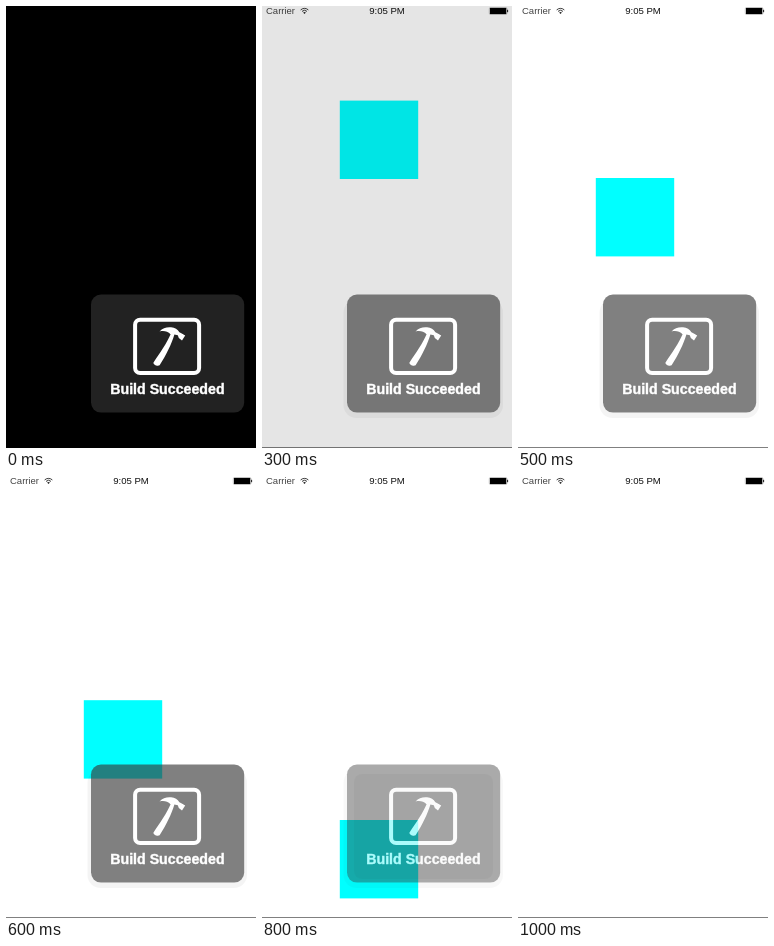
Recreate the animation shown at these times as an HTML page with a canvas. Size 250 by 442 pixels, loop 2400 ms.

```html
<!DOCTYPE html>
<html lang="en">
<head>
<meta charset="utf-8">
<title>Falling square</title>
<style>
html, body { margin: 0; width: 100%; height: 100%; overflow: hidden; background: #000; }
canvas { display: block; width: 250px; height: 442px; }
</style>
</head>
<body>
<canvas id="stage" width="250" height="442"></canvas>
<script>
const W = 250, H = 442, LOOP = 2400, STEP = 100;
const FONT = '"Liberation Sans", Arial, sans-serif';
const ctx = document.getElementById('stage').getContext('2d');

// One value per 100 ms step; the last value holds.
const dim = [1, 1, 0.5, 0.1, 0];
const squareTop = [80, 80, 79.7, 94.6, 128.8, 172, 224.2, 276, 344, 414, H];
const hudAlpha = [1, 1, 1, 1, 1, 1, 1, 1, 0.67, 0.32, 0];
const at = (list, i) => list[Math.min(i, list.length - 1)];

function roundRect(c, x, y, w, h, r) {
  c.beginPath();
  c.roundRect(x, y, w, h, r);
}

function drawHammer(c) {
  c.fill(new Path2D(
    'M153.6 325.4 C156.5 321.8 160.5 320.9 165 321.2 C169 321.6 171.6 323.2 173.4 326.3 ' +
    'L175.8 327.6 L179.2 329.4 L176 334.4 L172.8 332 L171.8 329.2 L168.4 328.4 ' +
    'C165.5 338 160 349.5 153.6 359.2 C151.6 360.6 147 358.6 147.5 356.4 ' +
    'C153.5 347.5 161 337 164.6 328.2 C161.5 325 157.5 324.4 153.6 325.4 Z'));
}

// The panel is composed once so that it fades as a group.
function makeHud() {
  const layer = document.createElement('canvas');
  layer.width = W;
  layer.height = H;
  const c = layer.getContext('2d');

  c.save();
  c.beginPath();
  c.rect(0, 0, W, H);
  c.roundRect(85, 288.6, 153.2, 118, 10);
  c.clip('evenodd');
  c.fillStyle = 'rgba(0,0,0,.045)';
  roundRect(c, 81.5, 293.5, 159.5, 118.5, 13);
  c.fill();
  c.restore();

  c.fillStyle = 'rgba(54,54,54,.63)';
  roundRect(c, 85, 288.6, 153.2, 118, 10);
  c.fill();

  c.strokeStyle = c.fillStyle = '#fff';
  c.lineWidth = 4;
  roundRect(c, 129.1, 313.8, 64, 53.2, 5);
  c.stroke();
  drawHammer(c);
  c.font = `bold 14.2px ${FONT}`;
  c.textAlign = 'center';
  c.lineWidth = 0.4;
  c.fillText('Build Succeeded', 161.4, 388.2);
  c.strokeText('Build Succeeded', 161.4, 388.2);
  return layer;
}

function drawStatusBar() {
  ctx.textAlign = 'left';
  ctx.font = `9.5px ${FONT}`;
  ctx.fillStyle = '#444';
  ctx.fillText('Carrier', 4, 8.2);

  ctx.fillStyle = '#111';
  ctx.textAlign = 'center';
  ctx.font = `9.6px ${FONT}`;
  ctx.fillText('9:05 PM', 125, 8.2);

  const up = -Math.PI / 2, spread = 0.76;
  ctx.fillStyle = ctx.strokeStyle = '#222';
  ctx.lineWidth = 0.9;
  for (const r of [3.6, 5.6]) {
    ctx.beginPath();
    ctx.arc(42.5, 8, r, up - spread, up + spread);
    ctx.stroke();
  }
  ctx.beginPath();
  ctx.moveTo(42.5, 8);
  ctx.arc(42.5, 8, 2, up - spread, up + spread);
  ctx.fill();

  ctx.fillStyle = '#000';
  ctx.strokeStyle = 'rgba(0,0,0,.45)';
  ctx.lineWidth = 0.6;
  roundRect(ctx, 227.3, 1.6, 17.6, 6.8, 1.2);
  ctx.stroke();
  ctx.fillRect(228, 2, 16.2, 6);
  ctx.fillRect(245.2, 3.8, 0.9, 2.4);
}

const hud = makeHud();

function draw(time) {
  const step = Math.floor((time % LOOP) / STEP);
  const alpha = at(hudAlpha, step);

  ctx.fillStyle = '#fff';
  ctx.fillRect(0, 0, W, H);
  drawStatusBar();
  ctx.fillStyle = '#0ff';
  ctx.fillRect(77.8, at(squareTop, step), 78.4, 78.4);
  ctx.fillStyle = '#808080';
  ctx.fillRect(0, 441, W, 1);

  ctx.fillStyle = `rgba(0,0,0,${at(dim, step)})`;
  ctx.fillRect(0, 0, W, H);

  if (alpha > 0 && alpha < 1) {
    ctx.fillStyle = 'rgba(0,0,0,.04)';
    roundRect(ctx, 92, 298, 139, 105, 8);
    ctx.fill();
  }
  ctx.globalAlpha = alpha;
  ctx.drawImage(hud, 0, 0);
  ctx.globalAlpha = 1;
}

const start = performance.now();
function tick() {
  draw(performance.now() - start);
  requestAnimationFrame(tick);
}
tick();
</script>
</body>
</html>
```
